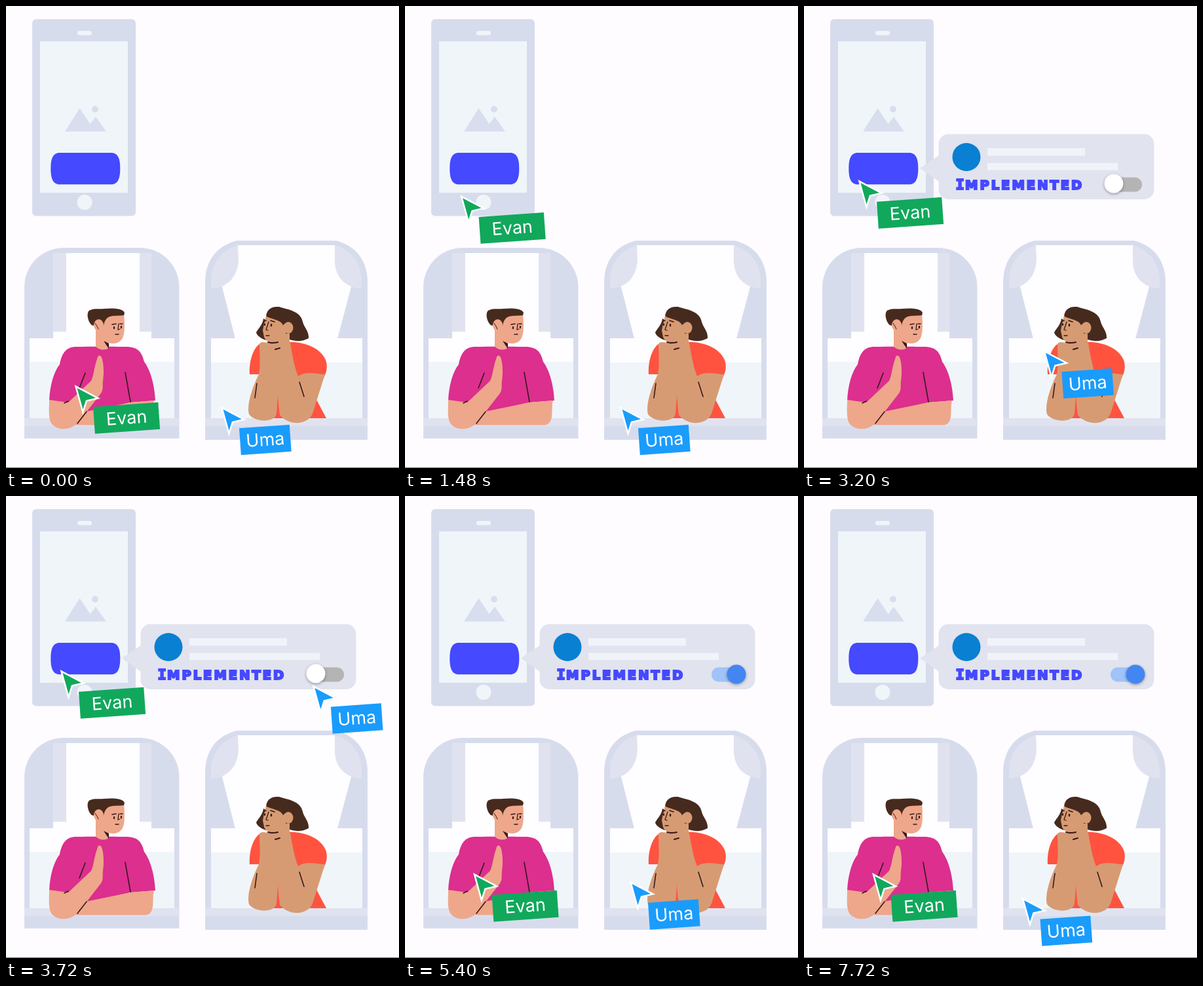
Recreate the animation shown at these times as an HTML page with a canvas. Size 600 by 705 pixels, loop 7.76 s.

```html
<!DOCTYPE html>
<html lang="en">
<head>
<meta charset="utf-8">
<title>Feature toggle</title>
<style>
html, body { margin: 0; width: 100%; height: 100%; overflow: hidden; background: #fefcff; }
canvas { display: block; width: 600px; height: 705px; }
</style>
</head>
<body>
<canvas id="stage" width="600" height="705"></canvas>
<script>
const ctx = document.getElementById('stage').getContext('2d');
const LOOP = 7760;
const FRAME = '#d7dced', SOFT = '#e0e3ef', PALE = '#f0f5fa', WHITE = '#fefdff';
const INK = '#35191c', HAIR = '#472a1e', BLUE = '#4549ff';

const clamp = v => Math.max(0, Math.min(1, v));
const span = (t, a, b) => clamp((t - a) / (b - a));
const mix = (a, b, p) => a + (b - a) * p;
const inOut = p => p < .5 ? 4 * p ** 3 : 1 - 4 * (1 - p) ** 3;
const out = p => Math.sin(p * Math.PI / 2);
const tint = (a, b, p) => `rgb(${a.map((v, i) => Math.round(mix(v, b[i], p)))})`;
const tint3 = (a, b, c, p) => p < .5 ? tint(a, b, p * 2) : tint(b, c, p * 2 - 1);

// quick travel followed by a slow settle
function travel(t, start, arrive, settle, main) {
  return main * inOut(span(t, start, arrive)) + (1 - main) * out(span(t, arrive, settle));
}

function fill(color, d) {
  ctx.fillStyle = color;
  ctx.fill(new Path2D(d));
}
function line(d, width = 1.6) {
  ctx.strokeStyle = INK;
  ctx.lineWidth = width;
  ctx.lineCap = ctx.lineJoin = 'round';
  ctx.stroke(new Path2D(d));
}
function rect(color, x, y, w, h, r = 0) {
  ctx.fillStyle = color;
  ctx.beginPath();
  ctx.roundRect(x, y, w, h, r);
  ctx.fill();
}
function dot(color, x, y, r, ry = r) {
  ctx.fillStyle = color;
  ctx.beginPath();
  ctx.ellipse(x, y, r, ry, 0, 0, Math.PI * 2);
  ctx.fill();
}

function phone() {
  rect(FRAME, 40, 20, 158, 300.5, 6);
  rect(PALE, 109, 38, 22, 6.5, 3);
  rect(PALE, 52, 54, 134, 231);
  fill('#d9deee', 'M90 191.5 L112.5 156 L128.5 180 L137 169 L153 191.5Z');
  dot('#d9deee', 136, 157.5, 5);
  dot(PALE, 120, 299.5, 11.5);
  fill(BLUE, 'M82 224 H160.5 C171 224 174.3 233 174.3 248 C174.3 263 171 272.3 160.5 272.3 H82 C71.500 272.3 68.300 263 68.300 248 C68.300 233 71.500 224 82 224Z');
}

function leftWindow() {
  rect(FRAME, 28, 369, 236.5, 291, [60, 60, 0, 0]);
  rect(SOFT, 72, 377, 150, 125);
  rect(WHITE, 92, 377, 112, 130);
  rect(WHITE, 72, 497, 150, 12);
  rect(WHITE, 36, 507, 221, 37);
  rect(PALE, 36, 543, 221, 86);
  rect(SOFT, 28, 629, 236.5, 12);
}

function rightWindow() {
  fill(FRAME, 'M304 662 V422 C304 388 322 366 352 358 H504 C534 366 552 388 552 422 V662Z');
  fill(WHITE, 'M355 365 H501 L527 428 L506 507 H544 V545 H313 V507 H350 L330 428Z');
  fill(SOFT, 'M355 365 V385 C355 412 338 431 313 431 V420 C313 394 328 372 355 365Z');
  fill(SOFT, 'M501 365 V385 C501 412 518 431 543 431 V420 C543 394 528 372 501 365Z');
  fill(WHITE, 'M354 365 H502 V390 C503 412 512 424 527 428 L506 507 H350 L330 428 C346 424 355 410 355 388Z');
  rect(PALE, 313, 544, 231, 85);
  rect(SOFT, 304, 629, 248, 12);
}

function man() {
  const skin = '#eea78a';
  fill('#dc2f8e', 'M106 520 C122 519.500 168 519.500 182 520 C200 520 207 526 211 543 C221 556 227 580 228 602 L190 605 L122 621 L66 602 C67 579 73 558 82 547 C85 531 91 520.500 106 520Z');
  fill(skin, 'M124 618.500 L190 605 L226 602 C222 614 230 639 212 639.500 H106Z');
  fill(skin, 'M66 601 C66 614 64 630 70 638 C80 649 99 647 110 636 L145 591 C149 585 147 579 148 572 C150 559 149 544 146 536 C143 531 140 533 139 539 C135 549 134 564 130 572 L95 605Z');
  line('M121 560 L112 583 M182 559 L190 604 M123 619 L109 637 M95 603 L89 606');
  fill(skin, 'M137 488 L158 488 L157 522 Q147 528 137 520Z');
  fill(skin, 'M148 474 L180 469 C181 481 181.500 493 180 500 C178 513 168 517 157 514 L146 508 L140 480Z');
  fill(HAIR, 'M131 487 C124 481 122 465 129 464 C135 461 143 463 149 462 C162 461 178 461 181 468 L180 472 C171 473 164 472 158 474 C153 476 150 481 149 488 L139 489Z');
  dot(skin, 141.5, 487, 7.5, 9);
  line('M136 484 Q139 488 141 493', 1);
  fill(INK, 'M149 511 L157 515 L157 523Z');
  line('M172 485 L171 494 L174 493 M167 501 L172 501', 1.3);
  line('M162 486 L168 485 M174 485 L178 485', 1.6);
  dot(INK, 165, 491, 1.2, 2.2);
  dot(INK, 176, 490, 1.2, 2.2);
}

function woman() {
  const skin = '#d79b73', red = '#ff5340';
  fill(HAIR, 'M397 479 C396 463 405 458 417 459 C429 463 450 465 453 482 C455 490 463 497 462 507 C451 513 439 512 428 507 L405 511 C394 511 383 504 382 498 C386 491 392 486 393 477Z');
  fill(red, 'M426 513 C456 511 480 522 488 540 C491 548 490 557 487 563 L472 597 L489 629 H402 V562 H372 C371 544 376 523 388 515Z');
  fill(skin, 'M407 500 H433 V525 H407Z');
  fill(skin, 'M397 473 L394 485 L392 495 L394 505 C397 513 405 514 413 512 L427 506 L427 484 L422 484 C420 476 408 473 399 472Z');
  fill(HAIR, 'M398 474 C397 465 407 462 414 464 L427 467 L430 481 L423 487 C419 479 410 479 398 474Z');
  dot(skin, 431, 491, 7.5, 9);
  fill(skin, 'M387 518 C386 511 397 513 402 515 C410 516 416 517 416 523 L417 570 L413 622 C411 636 380 636 371 623 C367 606 378 578 386 562 C389 550 387 530 387 518Z');
  fill(skin, 'M412 523 L434 514 C437 532 440 550 446 565 C459 556 474 562 487 562 L468 622 C461 639 433 642 418 624 C415 600 413 560 412 523Z');
  line('M383 576 L380 598 M448 574 L455 596');
  line('M400 513 Q408 515 415 513 M411 524 L418 522', 2);
  line('M401 482 L397 494 L400 495 M397 503 L402 503', 1.3);
  line('M404 480 L410 482 M394 481 L397 480', 1.7);
  dot(INK, 405, 487, 1.3, 2.3);
  dot(INK, 395, 486, 1.1, 2);
}

function toggle(t) {
  const p = span(t, 4180, 4540), slide = out(p);
  rect(tint3([180, 180, 181], [147, 179, 234], [160, 195, 250], p), 468, 261.5, 48, 22, 11);
  ctx.save();
  ctx.shadowColor = `rgba(0,0,0,${.35 * Math.abs(1 - 2 * p)})`;
  ctx.shadowBlur = 4;
  ctx.shadowOffsetY = 1.5;
  dot(tint3([255, 255, 255], [124, 167, 241], [68, 134, 241], p), mix(473, 506, slide), mix(271, 272, slide), 14.5);
  ctx.restore();
}

function word(text, font, x, y, spacing) {
  ctx.font = font;
  ctx.letterSpacing = spacing + 'px';
  ctx.fillStyle = ctx.strokeStyle = BLUE;
  ctx.lineWidth = 2.2;
  ctx.lineJoin = 'miter';
  ctx.strokeText(text, x, y);
  ctx.fillText(text, x, y);
  ctx.letterSpacing = '0px';
}

function callout(t) {
  fill('#e1e3ee', 'M177 247.5 L206 228 V268Z');
  rect('#e1e3ee', 205.5, 195.5, 329, 99.5, 15);
  dot('#0980d2', 248, 230.5, 21.5);
  rect('#f0f4fa', 280, 217, 149, 11.5);
  rect('#f0f4fa', 280, 239.5, 199, 11);
  ctx.textAlign = 'left';
  word('I', 'bold 22px "DejaVu Sans Mono", monospace', 231.5, 279.5, 0);
  word('MPLEMENTED', 'bold 19.5px "DejaVu Sans", sans-serif', 246, 279.5, 3);
  toggle(t);
}

const arrow = new Path2D('M1.5 2 L30 17 L15 20.500 L10.500 34.500Z');

function pointer(x, y, name, color, width) {
  ctx.save();
  ctx.translate(x, y);
  ctx.strokeStyle = '#fff';
  ctx.lineWidth = 5;
  ctx.lineCap = 'butt';
  ctx.lineJoin = 'miter';
  ctx.stroke(arrow);
  ctx.fillStyle = color;
  ctx.fill(arrow);
  ctx.translate(26, 30.8);
  ctx.rotate(-.07);
  rect(color, 0, 0, width, 41);
  ctx.fillStyle = '#fff';
  ctx.font = '27px Inter, sans-serif';
  ctx.textAlign = 'center';
  ctx.fillText(name, width / 2, 29.5);
  ctx.restore();
}

function evan(t) {
  const up = travel(t, 830, 1480, 2500, .926);
  const back = inOut(span(t, 3920, 4680));
  pointer(mix(mix(107, 85, up), 106.5, back), mix(mix(581, 268, up), 578, back), 'Evan', '#11a85c', 99.5);
}

function uma(t) {
  const up = travel(t, 2860, 3700, 4800, .94);
  const back = travel(t, 4820, 5400, 6200, .927);
  pointer(mix(mix(330, 478.5, up), 334.5, back), mix(mix(613.5, 271, up), 615, back), 'Uma', '#1a9cfc', 77);
}

const under = document.createElement('canvas');
under.width = 600;
under.height = 705;
const underCtx = under.getContext('2d');

function draw(t) {
  rect('#fefcff', 0, 0, 600, 705);
  phone();
  leftWindow();
  rightWindow();
  man();
  woman();
  // the callout fades in as one layer: draw it, then veil it with the scene below
  const shown = span(t, 1880, 2880);
  if (shown > 0) {
    underCtx.drawImage(ctx.canvas, 0, 0);
    callout(t);
    ctx.globalAlpha = 1 - shown;
    ctx.drawImage(under, 0, 0);
    ctx.globalAlpha = 1;
  }
  evan(t);
  uma(t);
  rect('#77767a', 0, 704, 600, 1);
}

const began = performance.now();
function tick() {
  draw((performance.now() - began) % LOOP);
  requestAnimationFrame(tick);
}
tick();
</script>
</body>
</html>
```
